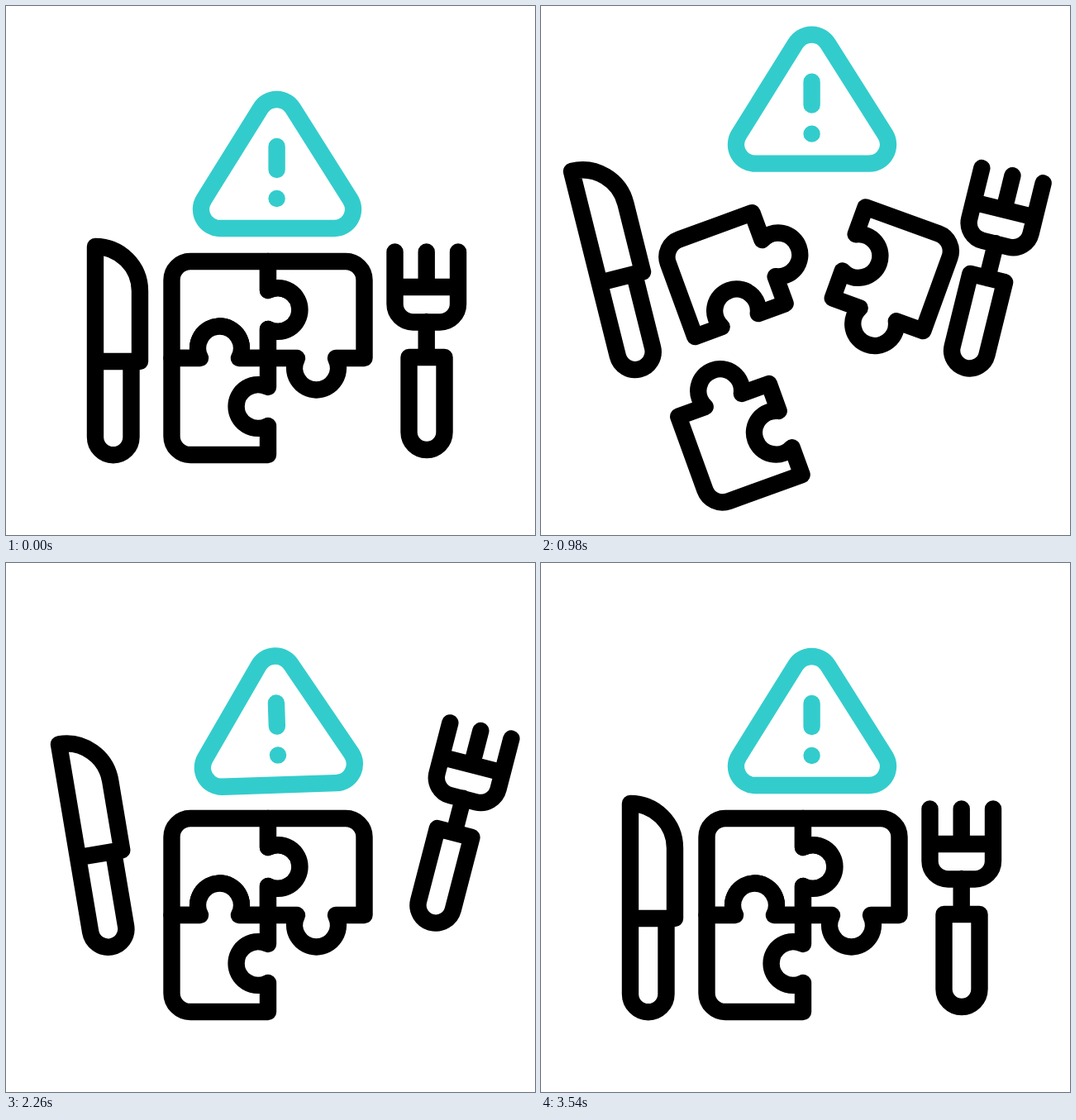
An HTML page for the animation above (3.6 s loop, 640 by 640 pixels).

```html
<!DOCTYPE html>
<html lang="en">
<head>
<meta charset="utf-8">
<title>Broken meal puzzle</title>
<style>
  html, body { margin: 0; width: 100%; height: 100%; overflow: hidden; background: #fff; }
  svg { display: block; width: 100vw; height: 100vh; }
  g { fill: #fff; stroke: #000; stroke-width: 20.4; stroke-linecap: round; stroke-linejoin: round; }
  .accent { stroke: #3cc; }
</style>
</head>
<body>
<svg viewBox="0 0 640 640">
  <g id="knife"><path d="M108 430V291A54 54 0 0 1 162 345V430H108V521.5A21.7 21.7 0 0 0 151.5 521.5V430"/></g>
  <g id="topLeft"><path d="M223 309H317V344A26.4 26.4 0 1 1 317 391V426H282A26.4 26.4 0 1 0 235 426H200.5V331.5A22.5 22.5 0 0 1 223 309Z"/></g>
  <g id="topRight"><path d="M317 309H411A22.5 22.5 0 0 1 433.5 331.5V426H399A26.4 26.4 0 1 1 352 426H317V391A26.4 26.4 0 1 0 317 344Z"/></g>
  <g id="bottomLeft"><path d="M200.5 426H235A26.4 26.4 0 1 1 282 426H317V461A26.4 26.4 0 1 0 317 508V543H223A22.5 22.5 0 0 1 200.5 520.5Z"/></g>
  <g id="fork"><path d="M470.5 297.5V360.5a22 22 0 0 0 22 22H525a22 22 0 0 0 22-22V297.5M470.5 340H547M508.7 297.5V340M508.7 382V425M487.5 425H530.5V515.5a21.5 21.5 0 0 1-43 0Z"/></g>
  <g id="bottomRight" class="accent"><path d="M317 426H352A26.4 26.4 0 1 0 399 426H433.5V520.5A22.5 22.5 0 0 1 411 543H317V508A26.4 26.4 0 1 1 317 461Z"/></g>
  <g id="warning" class="accent"><path d="M259 269H397A23 23 0 0 0 416.5 233.8L347 123.8A23 23 0 0 0 308 123.8L239.5 233.8A23 23 0 0 0 259 269ZM327.6 170V198M327.6 233h.01"/></g>
</svg>
<script>
const LOOP = 3600, START = 110, DRIFT_END = 1800;

const clamp = v => Math.min(1, Math.max(0, v));
const linear = (t, from, to) => clamp((t - from) / (to - from));
const ramp = (t, from, to) => { const u = linear(t, from, to); return u * u * (3 - 2 * u); };
const bump = (t, from, peak, to) => ramp(t, from, peak) - ramp(t, peak, to);

// Burst out, drift on, wind up, then return to rest
const scatter = (out, back, home) => t =>
  ramp(t, START, out) * (0.86 + 0.14 * linear(t, 600, DRIFT_END))
  * (1 + 0.08 * ramp(t, DRIFT_END, 2000)) * (1 - ramp(t, back, home));
const scatterPiece = scatter(580, 1840, 2240);

// far and rebound are [x, y, angle]
const parts = {
  knife: { pivot: [118.9, 406.3], far: [-50.4, -102.5, -15.5], rebound: [-4, 30, 3.9], progress: scatter(446, 1930, 2660) },
  fork: { pivot: [508.9, 406.5], far: [41.4, -100.7, 15.3], rebound: [-12.6, 12, -1.8], progress: scatter(580, 2150, 2660) },
  topLeft: { pivot: [258.7, 367.5], far: [-44, -44.7, -22.2], progress: scatterPiece },
  topRight: { pivot: [375.3, 367.5], far: [60.6, -52, 22], progress: scatterPiece },
  bottomLeft: { pivot: [258.7, 484.5], far: [-20.7, 50, -22], progress: scatterPiece },
  bottomRight: { pivot: [375.3, 484.5], far: [52, 45, 20], rebound: [-0.5, 2.5, 10.5], progress: t => ramp(t, 2900, 3440) }
};

function place(id, [px, py], [x, y, angle], scale = 1) {
  document.getElementById(id).setAttribute('transform',
    `translate(${px + x} ${py + y}) rotate(${angle}) scale(${scale}) translate(${-px} ${-py})`);
}

function draw(t) {
  const swing = bump(t, 2260, 2660, 3260);
  const grow = ramp(t, 2320, 2560);
  for (const [id, { pivot, far, rebound = [0, 0, 0], progress }] of Object.entries(parts)) {
    const s = progress(t), arc = 0.5 * s * (1 - s);
    const along = [s - arc, s + arc, s];
    const pose = far.map((v, i) => v * along[i] + rebound[i] * swing);
    place(id, pivot, pose, id === 'bottomRight' ? grow : 1);
  }
  document.getElementById('bottomRight').setAttribute('opacity', grow ? 1 - ramp(t, 3400, 3520) : 0);

  // The sign dips, leaps, sinks steadily and bounces
  const dip = bump(t, START, 380, 640), bounce = bump(t, 2260, 2660, 3540);
  const leap = ramp(t, 540, 740) * (1 - linear(t, 740, 2270));
  const tilt = 3.7 * dip - 1.9 * bump(t, 1840, 2260, 2500) + 2.1 * bounce;
  place('warning', [327.6, 190], [0, 6.7 * dip - 93 * leap + 13.5 * bounce, tilt]);
}

function tick() {
  draw(performance.now() % LOOP);
  requestAnimationFrame(tick);
}
tick();
</script>
</body>
</html>
```
